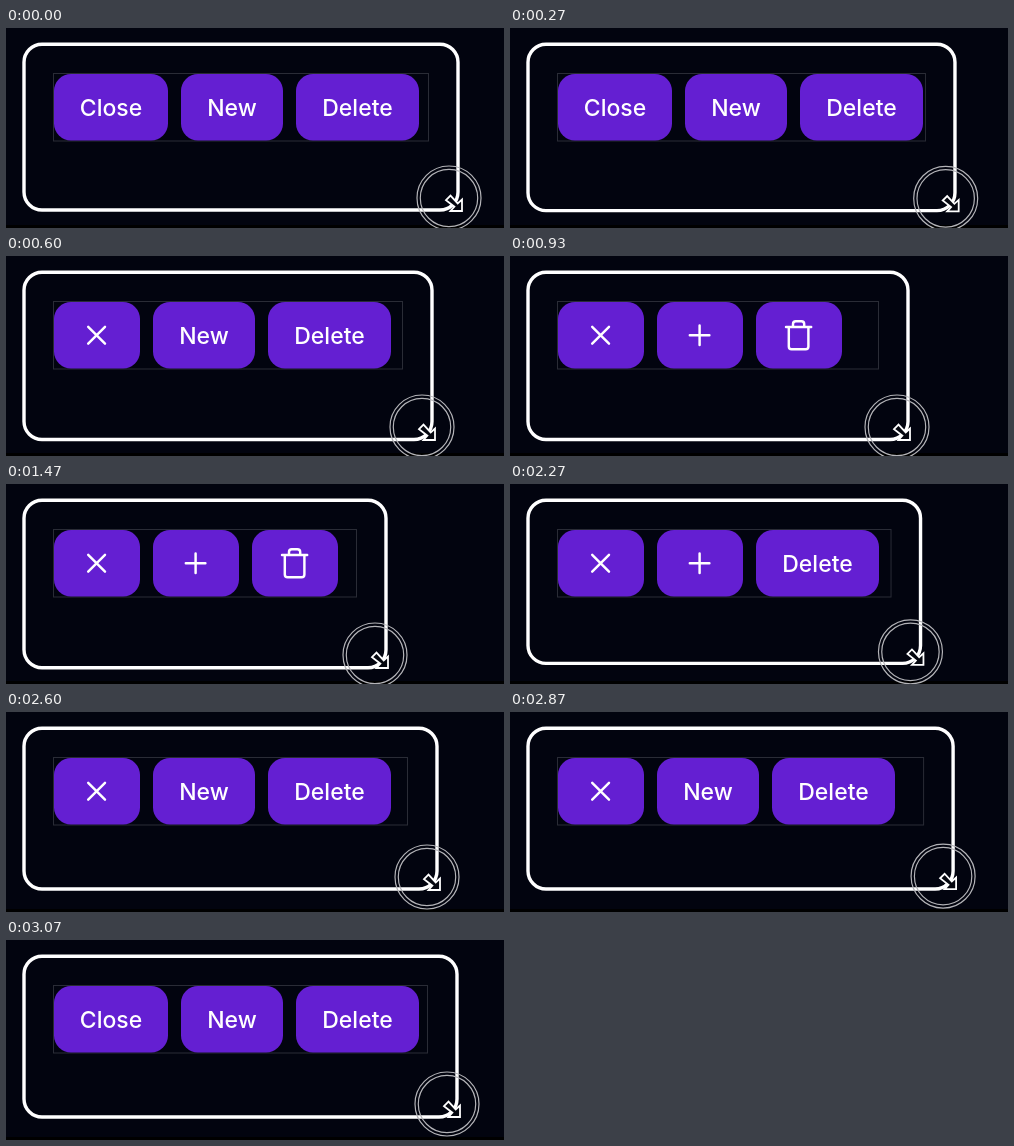
Write an HTML page that moves like this. It is 498 px wide and 200 px high and loops after 3140 ms.

```html
<!DOCTYPE html>
<html lang="en">
<head>
<meta charset="utf-8">
<title>Buttons that collapse to icons</title>
<style>
  html, body { margin: 0; width: 100%; height: 100%; overflow: hidden; background: #02040f; }
  svg { display: block; }
  text { font: 500 23px Inter, Roboto, sans-serif; fill: #fff; text-anchor: middle; }
  .button { fill: #641fd2; }
  .icon { fill: none; stroke: #fff; stroke-width: 1.75; stroke-linecap: round; stroke-linejoin: round; }
  .panel { fill: none; stroke: #fff; stroke-width: 3.4; }
  .toolbar { fill: none; stroke: #2a2c36; }
  .ring { fill: none; stroke: #b4b4b8; stroke-width: 1.2; }
  .cursor { fill: #05070f; stroke: #fff; stroke-width: 1.8; stroke-linejoin: miter; }
</style>
</head>
<body>
<svg width="498" height="200" viewBox="0 0 498 200">
  <rect y="197" width="498" height="3"/>
  <rect class="panel" id="panel" x="18" y="16.3" rx="18"/>
  <rect class="toolbar" id="toolbar" x="47.5" y="45.5" height="67.5"/>
  <g id="buttons"></g>
  <g id="pointer">
    <circle class="ring" r="32"/>
    <circle class="ring" r="28.7"/>
    <path class="cursor" d="M13 13V1.5L8.7 5.4 1.5-2.4-3 2.1 5.4 8.7 1.5 13Z"/>
  </g>
</svg>
<script>
const LOOP = 3140, FPS = 15, LEFT = 48, GAP = 13, ICON_WIDTH = 86;

const buttons = [
  { label: 'Close', width: 114, icon: 'M6 6 18 18M18 6 6 18' },
  { label: 'New', width: 102, icon: 'M5 12H19M12 5V19' },
  { label: 'Delete', width: 123,
    icon: 'M3 6H21M19 6V20a2 2 0 0 1-2 2H7a2 2 0 0 1-2-2V6M8 6V4a2 2 0 0 1 2-2h4a2 2 0 0 1 2 2v2' }
];

// step, panel right, panel bottom, pointer x, pointer y
const drag = [
  [0, 452, 182, 443, 170],
  [9, 426, 183.5, 416, 171],
  [14, 398, 183.5, 387, 171],
  [22, 380, 183.7, 369, 171],
  [25, 379, 183.7, 368.5, 171],
  [30, 390, 182, 381, 171],
  [33, 406, 180, 396, 168.5],
  [39, 431, 177, 421, 165],
  [46, 451, 177, 441, 164],
  [47, 452, 177, 442, 164]
];

const $ = id => document.getElementById(id);

function slope(i, c) {
  const a = drag[i - 1], b = drag[i], d = drag[i + 1];
  if (!a || !d || (b[c] - a[c]) * (d[c] - b[c]) <= 0) return 0;
  return (d[c] - a[c]) / (d[0] - a[0]);
}

// Cubic Hermite curve through the drag points
function track(step, c) {
  const i = Math.max(0, drag.findIndex(p => p[0] > step) - 1);
  const a = drag[i], b = drag[i + 1], h = b[0] - a[0], u = (step - a[0]) / h;
  const s = u * u * (3 - 2 * u);
  return a[c] + (b[c] - a[c]) * s +
    h * u * (1 - u) * ((1 - u) * slope(i, c) - u * slope(i + 1, c));
}

const widthOf = (b, i, collapsed) => i < collapsed ? ICON_WIDTH : b.width;

// Collapse from the left until the row fits
function countCollapsed(limit) {
  for (let n = 0; n < buttons.length; n++) {
    const end = buttons.reduce((x, b, i) => x + widthOf(b, i, n) + GAP, LEFT - GAP);
    if (end < limit) return n;
  }
  return buttons.length;
}

function drawButtons(collapsed) {
  let x = LEFT;
  $('buttons').innerHTML = buttons.map((b, i) => {
    const w = widthOf(b, i, collapsed), mid = x + w / 2;
    const face = i < collapsed
      ? `<path class="icon" transform="translate(${mid - 17.2} 62.5) scale(1.4)" d="${b.icon}"/>`
      : `<text x="${mid}" y="87.6">${b.label}</text>`;
    const out = `<rect class="button" x="${x}" y="46" width="${w}" height="66.5" rx="17"/>${face}`;
    x += w + GAP;
    return out;
  }).join('');
}

let shown = -1;
function render(now) {
  const step = Math.floor((now % LOOP + 5) * FPS / 1000);
  const [right, bottom, px, py] = [1, 2, 3, 4].map(c => track(Math.min(step, 46), c));
  const inner = right - 29.5;
  $('panel').setAttribute('width', right - 18);
  $('panel').setAttribute('height', bottom - 16.3);
  $('toolbar').setAttribute('width', inner - 47.5);
  $('pointer').setAttribute('transform', `translate(${px} ${py})`);
  const collapsed = countCollapsed(inner - 1);
  if (collapsed !== shown) drawButtons(shown = collapsed);
}

const start = performance.now();
function tick() {
  render(performance.now() - start);
  requestAnimationFrame(tick);
}
tick();
</script>
</body>
</html>
```
